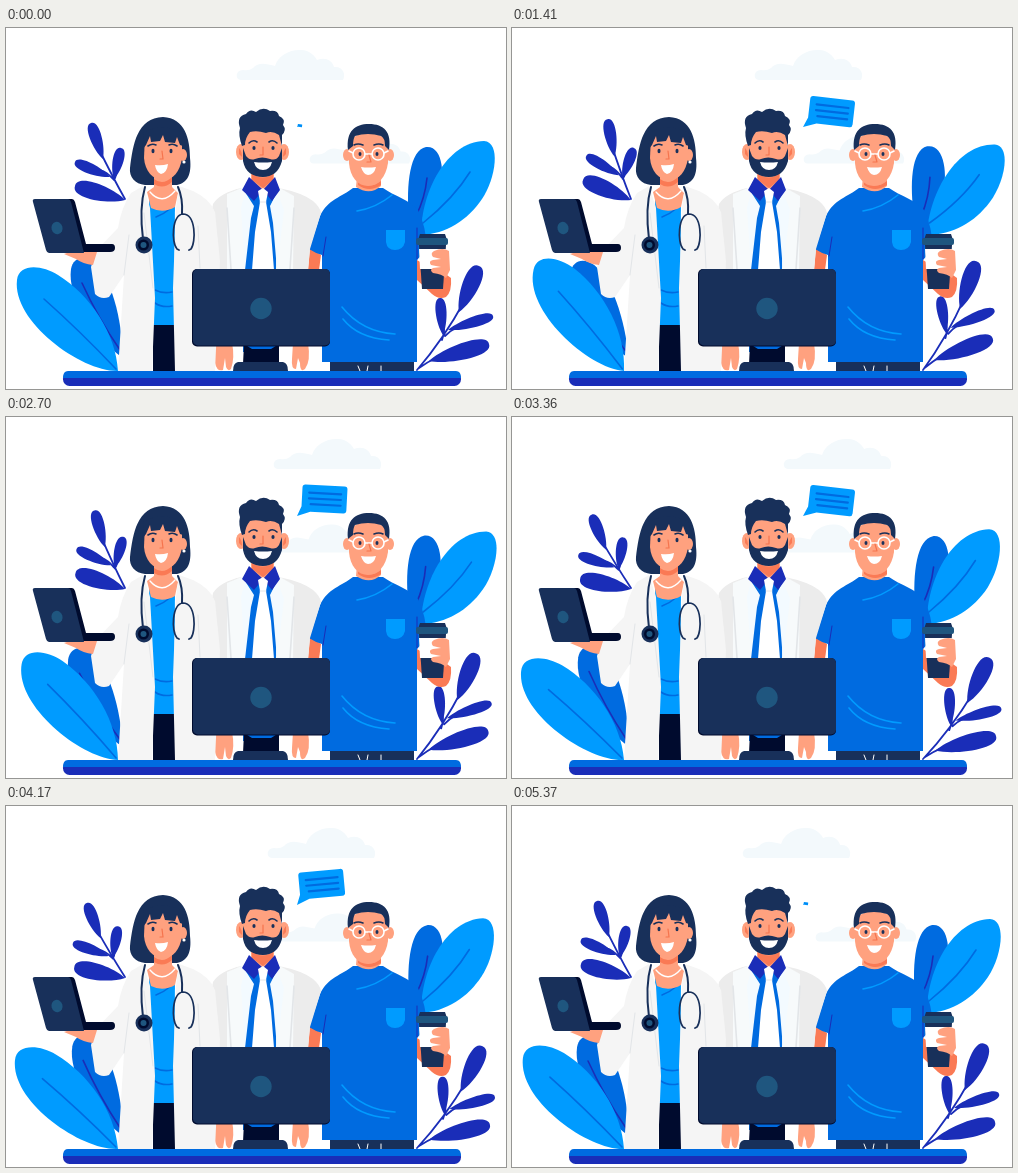
An HTML page for the animation above (5400 ms loop, 500 by 361 pixels).

```html
<!DOCTYPE html>
<html lang="en">
<head>
<meta charset="utf-8">
<title>Medical team</title>
<style>
html, body { margin: 0; width: 100%; height: 100%; overflow: hidden; background: #fff; }
svg { display: block; width: 100vw; height: 100vh; }
.sky { fill: #009bff; } .blue { fill: #006be0; } .deep { fill: #1a2db8; }
.navy { fill: #18305a; } .ink { fill: #000b2e; } .skin { fill: #ffa17f; }
.blush { fill: #fa7a55; } .coat { fill: #f5f5f5; } .grey { fill: #ececec; }
.white { fill: #fff; } .cloud { fill: #f3f9fc; } .disc { fill: #1f567f; }
.line { fill: none; stroke-linecap: round; stroke-linejoin: round; stroke-width: 1.6; }
.sSky { stroke: #009bff; } .sBlue { stroke: #006be0; } .sDeep { stroke: #1a2db8; }
.sNavy { stroke: #18305a; } .sWhite { stroke: #fff; } .sGrey { stroke: #e2e5e8; }
.sBlush { stroke: #f5744e; }
</style>
</head>
<body>
<svg viewBox="0 0 500 361">
  <defs>
    <path id="puff" d="M235 52C229 52 229 42 237 42Q243 43 247 40Q252 35 259 36Q266 37 269 38C272 28 283 22 293 22C303 21 309 28 311 32C319 29 326 32 328 39C337 38 340 46 337 52Z"/>
  </defs>

  <g id="cloudA" class="cloud"><use href="#puff"/></g>
  <g id="cloudB" class="cloud"><use href="#puff" transform="translate(88 87) scale(.935)"/></g>

  <g id="bubble">
    <path class="sky" d="M7-32H46Q49-32 49-29V-8Q49-5 46-5H13L0 0L4-10V-29Q4-32 7-32Z"/>
    <path class="line sBlue" style="stroke-width:2.2" d="M11-24H43M11-18.3H43M13-12.5H43"/>
  </g>

  <g id="sprigL" class="deep"></g>
  <g id="midL">
    <path class="blue" d="M117 330C86 308 61 268 65 241C67 229 79 226 89 235C105 250 116 290 117 330Z"/>
    <path class="line sDeep" d="M76 255Q92 290 114 322"/>
  </g>
  <g id="bigL">
    <path class="sky" d="M112 343C76 344 6 294 11 252C13 235 36 237 52 247C84 267 110 305 112 343Z"/>
    <path class="line sBlue" d="M38 271Q74 303 110 341"/>
  </g>
  <g id="midR">
    <path class="blue" d="M403 190C400 156 404 122 420 119C437 117 440 148 432 170Q425 190 409 204Z"/>
    <path class="line sDeep" d="M421 150Q419 170 410 188"/>
  </g>
  <g id="bigR">
    <path class="sky" d="M415 207C415 163 441 114 478 113C495 114 490 150 476 171C462 192 440 206 415 207Z"/>
    <path class="line sBlue" d="M464 144Q448 170 417 195"/>
  </g>
  <g id="sprigR" class="deep"></g>

  <!-- man in scrubs -->
  <g>
    <path class="blush" d="M304 220L315 227L313 242H302Z"/>
    <path class="navy" d="M324 332H408V343H324Z"/>
    <path class="line sWhite" style="stroke-width:1" d="M352 338L354 343M362 338L361 343M375 338V343"/>
    <path class="blush" d="M411 232L424 240L434 242L445 250Q446 264 440 269Q433 272 426 266L411 252Z"/>
    <path class="blue" d="M347 160C336 169 322 171 314 188L303 221Q309 225 316 227V334H411V232L421 221Q420 198 412 182C404 172 388 168 377 160Z"/>
    <path class="skin" d="M351 148H375V158Q364 168 350 159Z"/>
    <path class="blush" d="M352 153Q363 162 375 153V157Q363 165 352 157Z"/>
    <ellipse class="skin" cx="341" cy="127" rx="4" ry="6"/>
    <ellipse class="skin" cx="384" cy="127" rx="4" ry="6"/>
    <path class="skin" d="M343 112Q362 98 382 112V135C380 149 372 158 362 158C352 158 344 149 343 135Z"/>
    <path class="navy" d="M342 122C340 103 349 96 363 96C378 96 386 104 383 122L379 118Q379 110 375 108Q362 104 349 108Q347 111 347 118Z"/>
    <path class="line sNavy" d="M348 117Q352 115 357 117M368 117Q373 115 377 117"/>
    <ellipse class="navy" cx="354" cy="126" rx="1.5" ry="2"/>
    <ellipse class="navy" cx="371" cy="126" rx="1.5" ry="2"/>
    <path class="line sWhite" d="M359 126H366M343 123L347 125M378 125L382 123"/>
    <circle class="line sWhite" cx="353" cy="126" r="6"/>
    <circle class="line sWhite" cx="372" cy="126" r="6"/>
    <path class="line sBlush" style="stroke-width:1.2" d="M363 127L365 134H361"/>
    <path class="white" d="M355 139Q362 140 370 139Q368 147 362 147Q357 146 355 139Z"/>
    <path class="sky" d="M380 202H399V214Q397 222 389 222Q381 222 380 214Z"/>
    <path class="line sSky" d="M351 183Q370 180 386 167M336 279Q356 304 389 306M337 291Q352 310 383 312"/>
    <path class="line sDeep" style="stroke-width:1" d="M317 228L320 209M411 231V200"/>
    <path class="navy" d="M413 217H440L437 261H416Z"/>
    <path class="white" d="M413 221H440L438 241H414Z"/>
    <path class="navy" d="M414 206H439L441 212H412Z"/>
    <rect class="disc" x="410" y="210" width="32" height="7" rx="2"/>
    <path class="skin" d="M428 223Q437 219 443 223L444 242L440 250Q436 246 427 245Q423 242 427 240L435 239L425 237Q422 233 427 232L435 231L427 229Q424 225 428 223Z"/>
  </g>

  <!-- bearded doctor -->
  <g>
    <path class="skin" d="M209 315H226Q229 329 225 341Q222 344 220 339L219 330L217 342Q211 344 209 335ZM287 315H302Q305 333 299 341Q294 345 294 335L292 330L290 341Q285 341 286 331Z"/>
    <path class="grey" d="M235 160Q214 165 207 176L196 244H229L236 190ZM273 160Q297 165 307 173Q314 179 315 185L304 221L302 243H280Z"/>
    <path style="fill:#f7fafb" d="M238 159L221 166V242H287L288 168L272 159Z"/>
    <path class="line sGrey" d="M221 180L225 241M288 180L284 241"/>
    <path class="blue" d="M240 156H271L270 242H239Z"/>
    <path style="fill:#f3faff" d="M239 164L235 180L239 242L245 190L248 178ZM271 164L278 182L271 242L267 195L264 178Z"/>
    <path class="skin" d="M245 143H268V152L257 164L245 152Z"/>
    <path class="blush" d="M246 146Q257 153 267 146V152L257 160L246 152Z"/>
    <path class="deep" d="M243 149L257 162L248 173L236 162ZM269 149L257 162L266 173L274 162Z"/>
    <path class="white" d="M252 163L257 160L262 164L260 174L265 204L268 242H246L249 204L254 174Z"/>
    <path class="line sGrey" style="stroke-width:1" d="M254 174H260"/>
    <ellipse class="skin" cx="235" cy="124" rx="5" ry="8"/>
    <ellipse class="skin" cx="278" cy="124" rx="5" ry="8"/>
    <path class="blush" d="M233 120Q236 123 236 129L233 126ZM280 120Q277 123 277 129L280 126Z"/>
    <path class="skin" d="M238 101H275V132C273 143 266 148 257 148C247 148 239 142 238 132Z"/>
    <path class="navy" d="M237 120L240 128Q244 133 249 131Q256 128 264 131Q270 133 273 128L276 120V133C273 144 266 149 257 149C247 149 239 144 237 133Z"/>
    <path class="navy" d="M236 118Q232 107 234 100Q230 88 240 86Q244 80 250 84Q257 78 264 83Q272 82 273 88Q280 91 277 97Q281 102 276 107L276 118L273 107Q266 102 260 105Q251 102 244 104Q239 110 239 117Z"/>
    <path class="line sNavy" d="M243 115Q247 111 251 114M263 114Q267 111 271 115"/>
    <ellipse class="navy" cx="248" cy="120" rx="1.6" ry="2.1"/>
    <ellipse class="navy" cx="267" cy="120" rx="1.6" ry="2.1"/>
    <path class="line sBlush" style="stroke-width:1.2" d="M257 119V127H254"/>
    <path class="white" d="M248 134Q257 135 266 134Q264 142 257 142Q250 142 248 134Z"/>
  </g>

  <!-- woman with laptop -->
  <g>
    <path class="navy" d="M139 157C129 156 123 149 124 140C127 116 131 90 157 89C179 90 184 111 184 130C186 147 181 155 171 157Z"/>
    <path class="ink" d="M147 290H170V343H147Z"/>
    <path class="sky" d="M143 172H169L168 297H147Z"/>
    <path class="line sBlue" d="M149 262Q157 266 166 264M149 275Q156 280 166 278M150 189Q158 186 165 180"/>
    <path class="skin" d="M148 145H166V159L172 165L169 179Q157 186 145 180L141 164L148 159Z"/>
    <path class="blush" d="M148 151Q157 158 166 149V154Q157 162 148 156Z"/>
    <path class="line sWhite" style="stroke-width:1.3" d="M144 164Q156 178 169 163"/>
    <path class="coat" d="M137 158L125 165Q115 180 112 200L90 223L85 239L89 266Q95 272 103 269L118 247L112 343H146L149 270L144 180ZM173 158L187 163Q204 171 209 184L214 233L209 343H169L167 260L170 180Z"/>
    <path class="line sGrey" style="stroke-width:1" d="M118 247L123 207M194 240L192 198M138 185L147 260"/>
    <ellipse class="skin" cx="177" cy="127" rx="4" ry="6"/>
    <circle class="white" cx="178" cy="134" r="1.6"/>
    <path class="skin" d="M139 107H176V130C174 144 167 152 157 152C147 152 139 143 138 130Z"/>
    <path class="navy" d="M136 122L138 104Q156 95 176 104L180 119L174 117L171 109L169 115L159 114L157 107L154 113L145 114L144 108L140 117Z"/>
    <path class="line sNavy" d="M142 118Q146 115 150 117M163 117Q167 115 171 118"/>
    <ellipse class="navy" cx="147" cy="123" rx="1.5" ry="2.2"/>
    <ellipse class="navy" cx="165" cy="123" rx="1.5" ry="2.2"/>
    <path class="line sBlush" style="stroke-width:1.2" d="M156 123L157 131H154"/>
    <path class="white" d="M149 137Q156 138 162 136Q161 145 155 146Q150 144 149 137Z"/>
    <path class="line sNavy" style="stroke-width:2" d="M139 159Q133 180 137 211M172 159Q177 170 176 186"/>
    <path class="line sNavy" style="stroke-width:1.7" d="M171 221C165 214 166 187 177 186C190 186 190 214 185 221M171 221L173 222M185 221L183 222"/>
    <circle class="navy" cx="138" cy="217" r="8.5"/>
    <circle class="ink" cx="137.5" cy="217" r="5.5"/>
    <circle class="disc" cx="137.5" cy="217" r="3"/>
    <path class="skin" d="M58 226Q68 222 91 224L87 237Q77 236 70 231Z"/>
    <path class="ink" d="M60 171H66Q68 171 69 174L80 216H106Q109 216 109 220Q109 224 104 224H72Z"/>
    <path class="navy" d="M29 171H62Q64 171 65 174L78 225H43Q41 225 40 222L27 174Q26 171 29 171Z"/>
    <ellipse class="disc" cx="51" cy="200" rx="5.5" ry="6.3" transform="rotate(-15 51 200)"/>
  </g>

  <!-- monitor and desk -->
  <path class="blue" d="M237 316H273V324H237Z"/>
  <path class="ink" d="M238 316L246 321H265L273 316V336H237Z"/>
  <rect class="ink" x="186" y="241" width="138" height="77.500" rx="5"/>
  <rect class="navy" x="187" y="241" width="137" height="76.500" rx="5"/>
  <circle class="disc" cx="255" cy="280.500" r="10.700"/>
  <path class="navy" d="M232 334H277Q282 335 282 343H227Q227 335 232 334Z"/>
  <rect class="deep" x="57" y="344" width="398" height="14" rx="6.500"/>
  <path class="blue" d="M62 343H450Q455 343 455 350H57Q57 343 62 343Z"/>
</svg>
<script>
const LOOP = 5400, STEP = 30;
const $ = id => document.getElementById(id);

// Leaf outline from stem point (x, y) to its rounded tip; half is half the width.
function leaf(x, y, tx, ty, half) {
  const dx = tx - x, dy = ty - y, k = half / 0.72 / Math.hypot(dx, dy);
  const at = (along, side) =>
    `${(x + dx * along - dy * k * side).toFixed(1)} ${(y + dy * along + dx * k * side).toFixed(1)}`;
  return `M${x} ${y}C${at(.3, .8)} ${at(1.02, 1.1)} ${tx} ${ty}C${at(1.02, -1.1)} ${at(.3, -.8)} ${x} ${y}Z`;
}

function sprig(id, stems, leaves) {
  $(id).innerHTML = `<path class="line sDeep" style="stroke-width:1.8" d="${stems}"/>` +
    `<path d="${leaves.map(l => leaf(...l)).join('')}"/>`;
}

sprig('sprigL', 'M119 171Q106 148 92 119M107 151Q101 144 94 142M108 152Q111 147 110 139',
  [[97, 131, 85, 95, 6], [104, 149, 69, 134, 5.5], [108, 151, 115, 120, 5.5], [119, 172, 69, 158, 8.5]]);
sprig('sprigR', 'M411 342Q437 312 459 272M436 312Q440 302 436 290M439 308Q449 298 465 294M413 340Q430 328 450 322',
  [[453, 284, 473, 238, 8.5], [437, 307, 434, 270, 5.5], [442, 302, 487, 288, 5.5], [423, 333, 483, 316, 8.5]]);

// Smooth looping track through [time, value] points, flat at its turning points.
function track(...pts) {
  const n = pts.length;
  const point = i => {
    const turn = Math.floor(i / n), p = pts[i - turn * n];
    return [p[0] + turn * LOOP, p[1]];
  };
  const slope = i => {
    const a = point(i - 1), b = point(i), c = point(i + 1);
    const s = (b[1] - a[1]) / (b[0] - a[0]), r = (c[1] - b[1]) / (c[0] - b[0]);
    return s * r <= 0 ? 0 : 2 * s * r / (s + r);
  };
  return t => {
    let i = n - 1;
    while (i && pts[i][0] > t) i--;
    const a = point(i), b = point(i + 1), h = b[0] - a[0], u = (t - a[0]) / h, v = 1 - u;
    return v * v * ((1 + 2 * u) * a[1] + u * h * slope(i)) +
           u * u * ((1 + 2 * v) * b[1] - v * h * slope(i + 1));
  };
}

const drift = track([0, 0], [720, 4], [1410, 12], [2070, 26], [2700, 37], [3200, 41.5], [4170, 31], [4800, 13]);
const sway = track([0, 0], [600, 1.9], [1170, 5], [1410, 6.3], [1900, 7], [2280, 6], [2850, 1.7],
  [3360, -1.2], [3700, -1.6], [4170, -1.3], [5160, -.3]);
const bend = track([0, 0], [720, 3.7], [1410, 7.7], [1800, 8.4], [2070, 8], [2850, 1], [3360, -4.2],
  [3600, -4.6], [4170, -3.3], [5160, -.4]);
const grow = track([0, .1], [240, .5], [600, .97], [720, 1], [4750, 1], [5160, .47], [5370, .1]);
const tilt = track([0, 8], [720, -4.5], [880, -5], [1150, 4], [1410, 6.5], [2070, 2.7], [2700, 3],
  [3360, 6.5], [3700, 2], [4170, -5.3], [4600, -6], [5000, -3], [5370, 8]);

const plants = [
  ['sprigL', 119, 171, bend, 1], ['sprigR', 411, 342, bend, -.6],
  ['bigL', 112, 343, sway, 1], ['midL', 116, 335, sway, -.62],
  ['bigR', 417, 203, sway, .5], ['midR', 407, 200, sway, -.55]
];

function place(id, transform) { $(id).setAttribute('transform', transform); }

function draw(t) {
  const d = drift(t);
  place('cloudA', `translate(${d} 0)`);
  place('cloudB', `translate(${-d} 0)`);
  place('bubble', `translate(291 99) rotate(${tilt(t)}) scale(${grow(t)})`);
  for (const [id, x, y, move, amount] of plants) place(id, `rotate(${move(t) * amount} ${x} ${y})`);
}

const start = performance.now();
function tick(now) {
  const t = Math.max(0, now - start) % LOOP;
  draw(Math.floor(t / STEP) * STEP);
  requestAnimationFrame(tick);
}
draw(0);
requestAnimationFrame(tick);
</script>
</body>
</html>
```
